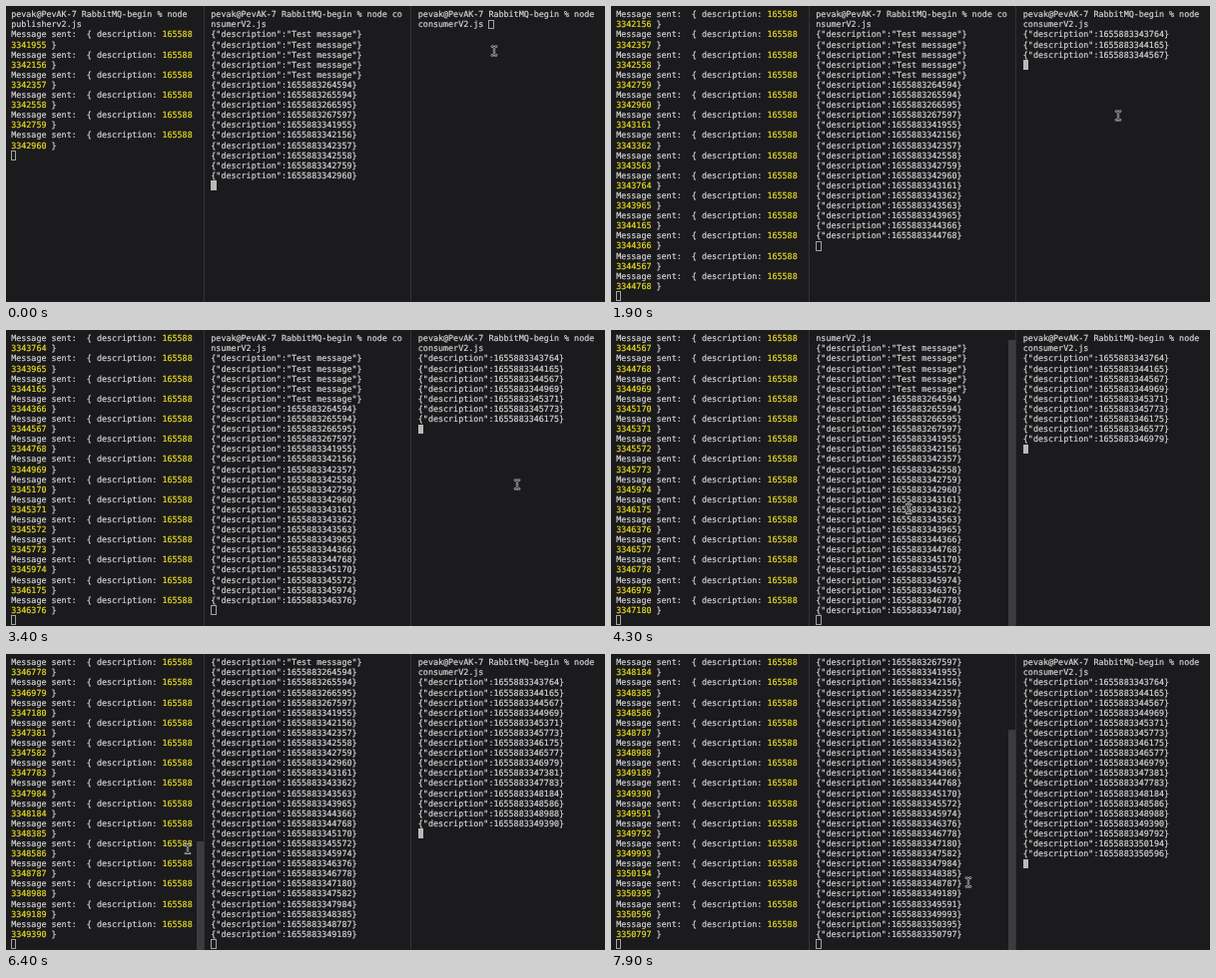
These frames come from a looping animation (600x297 px, 8000 ms). An HTML page:

```html
<!DOCTYPE html>
<html lang="en">
<head>
<meta charset="utf-8">
<title>Publisher and consumers</title>
<style>
  html, body { margin: 0; width: 100%; height: 100%; overflow: hidden; background: #1b1a1d; }
  #stage { position: relative; width: 600px; height: 297px; overflow: hidden; background: #1b1a1d; }
  pre {
    position: absolute; top: 3.3px; margin: 0; color: #d4d4d4; white-space: pre;
    font: 8.4px/10.1px "DejaVu Sans Mono", Menlo, monospace;
    text-rendering: geometricPrecision;
    -webkit-text-stroke: .2px currentcolor;
  }
  b { font-weight: normal; color: #e6dc22; }
  .rule { position: absolute; top: 0; width: 1px; height: 297px; background: #333235; }
  .slider { position: absolute; width: 7.5px; background: #797979; }
  .caret { position: absolute; width: 5.6px; height: 9.8px; box-sizing: border-box; border: 1px solid #a2a2a2; }
  .caret.on { background: #b9b9b9; border-color: #b9b9b9; }
  #mouse { position: absolute; left: 0; top: 0; width: 10px; height: 14px; }
</style>
</head>
<body>
<div id="stage">
  <div class="rule" style="left:198px"></div>
  <div class="rule" style="left:405px"></div>
</div>
<script>
const LOOP = 8000, TICK = 100;
const ROWS = 29, ROW_H = 10.1, CHAR_W = 5.057, TOP = 3.6, HEIGHT = 297;
const CLICK = 200, ENTER = 400;   // third terminal gets focus, then runs its command
const FIRST = 1655883341955, GAP = 200.95;
const OLD = 1655883264594;
const LEAD = 1063;                // time the publisher has run when the loop starts
const SOLO = 9;                   // messages handled before the second consumer joins
const FADE = 600, BAR_ALPHA = .35;

// pointer stops: time, x, y
const stops = [
  [0, 489, 45], [600, 511, 43], [1900, 508, 110], [3400, 512, 155],
  [4900, 182, 193], [6800, 182, 196], [7700, 358, 229]
];

const prompt = "pevak@PevAK-7 RabbitMQ-begin % node ";
const json = value => `{"description":${value}}`;
const stamp = i => FIRST + Math.round(GAP * i);
const oldStamp = i => OLD + 1000 * i + Math.floor(i * i / 3);
const list = (n, make) => Array.from({ length: n }, (_, i) => make(i));

function sent(i) {
  const s = String(stamp(i));
  return [`Message sent:  { description: <b>${s.slice(0, 6)}</b>`, `<b>${s.slice(6)}</b> }`];
}

function pointer(t) {
  const next = stops.findIndex(s => s[0] > t);
  if (next < 0) return stops.at(-1).slice(1);
  const [t0, x0, y0] = stops[Math.max(0, next - 1)];
  const [t1, x1, y1] = stops[next];
  const p = (t - t0) / (t1 - t0);
  const e = p * p * (3 - 2 * p);
  return [x0 + (x1 - x0) * e, y0 + (y1 - y0) * e];
}

const stage = document.getElementById("stage");

function add(tag, cls, left) {
  const el = document.createElement(tag);
  el.className = cls;
  el.style.left = left + "px";
  stage.append(el);
  return el;
}

function makePane(from, to, x) {
  return {
    from, to, x,
    bar: add("div", "slider", to - 7.5),
    caret: add("div", "caret", x - .3),
    text: add("pre", "", x)
  };
}

const publisher = makePane(0, 198, 5.2);
const consumerA = makePane(198, 405, 205.3);
const consumerB = makePane(405, 600, 412.8);

stage.insertAdjacentHTML("beforeend", `
  <svg id="mouse" viewBox="-5 -7 10 14" fill="none" stroke-linecap="round">
    <defs><path id="beam" d="M-2.2-4.4Q0-4.4 0-3.2Q0-4.4 2.2-4.4M0-3.2V3.2M-2.2 4.4Q0 4.4 0 3.2Q0 4.4 2.2 4.4"/></defs>
    <use href="#beam" stroke="#cfcfcf" stroke-width="2.3"/>
    <use href="#beam" stroke="#1b1a1d" stroke-width="1"/>
  </svg>`);
const mouse = document.getElementById("mouse");

// a scrollbar shows under the pointer and fades once it has left
function barAlpha(pane, t) {
  for (let age = 0; age < FADE && age <= t; age += TICK) {
    const [x] = pointer(t - age);
    if (x >= pane.from && x < pane.to) return BAR_ALPHA * (1 - age / FADE);
  }
  return 0;
}

function drawPane(pane, t, lines, focused, column = 0) {
  const total = lines.length + (column ? 0 : 1);
  const hidden = Math.max(0, total - ROWS);
  const { text, caret, bar } = pane;
  text.innerHTML = lines.slice(hidden).join("\n");
  caret.style.left = pane.x - .3 + column * CHAR_W + "px";
  caret.style.top = TOP + (total - 1 - hidden) * ROW_H + "px";
  caret.classList.toggle("on", focused);
  bar.style.opacity = hidden ? barAlpha(pane, t) : 0;
  bar.style.top = HEIGHT * hidden / total + "px";
  bar.style.height = HEIGHT * ROWS / total + "px";
}

function draw(t) {
  const count = Math.floor((t + LEAD) / GAP) + 1;
  const ids = list(count, i => i);
  const toB = i => i >= SOLO && i % 2 === 1;
  const received = i => json(stamp(i));

  drawPane(publisher, t, [prompt, "publisherv2.js", ...ids.flatMap(sent)], false);
  drawPane(consumerA, t, [
    prompt + "co", "nsumerV2.js",
    ...list(5, () => json('"Test message"')),
    ...list(4, i => json(oldStamp(i))),
    ...ids.filter(i => !toB(i)).map(received)
  ], t < CLICK);
  drawPane(consumerB, t, [prompt, "consumerV2.js", ...ids.filter(toB).map(received)],
    t >= CLICK, t < ENTER ? 14 : 0);

  const [x, y] = pointer(t);
  mouse.style.transform = `translate(${x - 5}px, ${y - 7}px)`;
}

const start = performance.now();
let shown = -1;

function frame() {
  const t = Math.floor((performance.now() - start) % LOOP / TICK) * TICK;
  if (t !== shown) draw(shown = t);
  requestAnimationFrame(frame);
}
frame();
</script>
</body>
</html>
```
